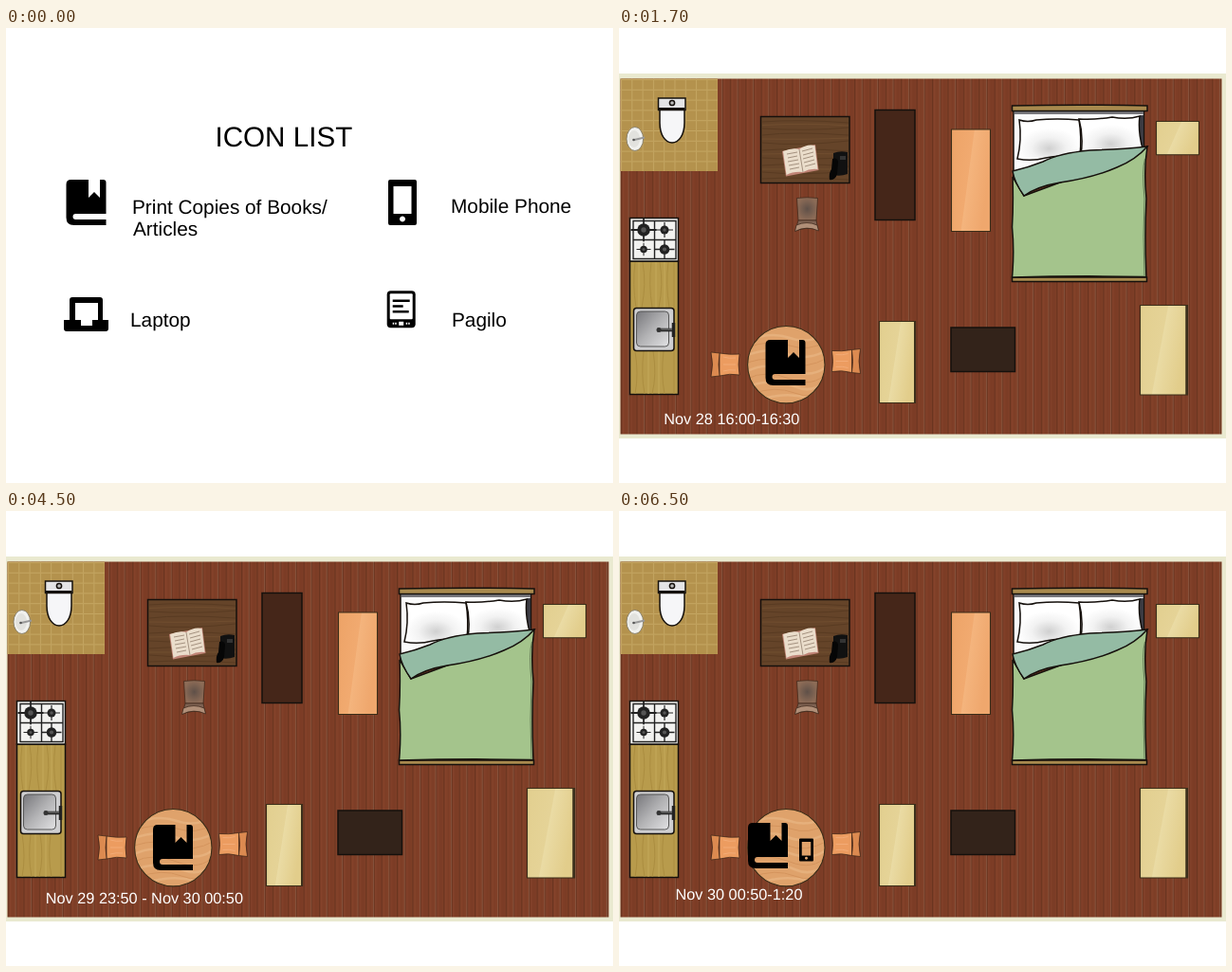
Write an HTML page that moves like this. It is 640x480 px and loops after 8 s.

```html
<!DOCTYPE html>
<html lang="en">
<head>
<meta charset="utf-8">
<title>Icon list and room plan</title>
<style>
html, body { margin: 0; width: 100%; height: 100%; overflow: hidden; background: #fff; }
svg { display: block; width: 100vw; height: 100vh; }
text { font-family: "Liberation Sans", Arial, sans-serif; text-rendering: geometricPrecision; }
.label { font-size: 20.8px; }
.date { font-size: 16.3px; fill: #fff; }
.line { stroke: #15100c; stroke-width: 1.5; }
.edge { stroke: #3a2d18; stroke-width: 1.1; }
.thin { stroke: #3a2417; stroke-width: .7; }
.grain { fill: none; stroke-width: 1; }
.scene { visibility: hidden; animation: 8s step-end infinite; }
#list { animation-name: list; }
#one { animation-name: one; }
#two { animation-name: two; }
#three { animation-name: three; }
#four { animation-name: four; }
@keyframes list { 0% { visibility: visible } 6.25%, 100% { visibility: hidden } }
@keyframes one { 0% { visibility: hidden } 6.25% { visibility: visible } 31.25%, 100% { visibility: hidden } }
@keyframes two { 0% { visibility: hidden } 31.25% { visibility: visible } 56.25%, 100% { visibility: hidden } }
@keyframes three { 0% { visibility: hidden } 56.25% { visibility: visible } 81.25%, 100% { visibility: hidden } }
@keyframes four { 0% { visibility: hidden } 81.25%, 100% { visibility: visible } }
</style>
</head>
<body>
<svg viewBox="0 0 640 480" preserveAspectRatio="none">
<defs>
  <pattern id="planks" x="2" y="53" width="16.4" height="376" patternUnits="userSpaceOnUse">
    <path fill="#814028" d="M0 0H8.2V376H0z"/>
    <path fill="#7d3d26" d="M8.2 0H16.4V376H8.2z"/>
    <path stroke="#68331f" stroke-width="1.2" d="M.7 0V376M8.9 0V376"/>
    <path stroke="#87452c" stroke-width=".8" d="M2.3 0V376M10.5 0V376"/>
    <path stroke="#783a24" stroke-width=".8" d="M5 0V376M13.6 0V376"/>
  </pattern>
  <pattern id="tiles" x="2" y="54" width="11.3" height="10.8" patternUnits="userSpaceOnUse">
    <path fill="#b4924d" d="M0 0H11.3V10.8H0z"/>
    <path fill="none" stroke="#c5a764" stroke-width=".9" d="M.5 10.8V.5H11.3"/>
  </pattern>
  <linearGradient id="pine" x2="1" y2=".35">
    <stop stop-color="#e2cf8f"/><stop offset=".52" stop-color="#e5d397"/>
    <stop offset=".54" stop-color="#eadba4"/><stop offset="1" stop-color="#e2cd8b"/>
  </linearGradient>
  <linearGradient id="peach" x2="1" y2=".35">
    <stop stop-color="#eda367"/><stop offset=".52" stop-color="#f1aa70"/>
    <stop offset=".54" stop-color="#f4b47d"/><stop offset="1" stop-color="#efa76d"/>
  </linearGradient>
  <linearGradient id="steel" x2="1" y2="1">
    <stop stop-color="#77777b"/><stop offset=".5" stop-color="#b2b2b4"/><stop offset="1" stop-color="#e2e2e4"/>
  </linearGradient>
  <radialGradient id="pillow" cy=".72">
    <stop stop-color="#d0d0d0"/><stop offset=".55" stop-color="#f2f2f2"/><stop offset="1" stop-color="#fff"/>
  </radialGradient>
  <radialGradient id="seat"><stop stop-color="#5f5048"/><stop offset="1" stop-color="#8d6c57"/></radialGradient>
  <clipPath id="round"><circle cx="176.3" cy="355.2" r="40.5"/></clipPath>

  <path id="book" d="M5 0H23.5V19L29.5 13L35.5 19V0H39Q42 0 42 3V36H10a3 3 0 0 0 0 6H42V48H8Q0 48 0 40V5Q0 0 5 0z"/>
  <path id="laptop" fill-rule="evenodd" d="M6 24V3Q6 0 9 0H38Q41 0 41 3V24H47V33Q47 36 44 36H3Q0 36 0 33V24zM12 6V24H18V30H30V24H36V6z"/>
  <path id="phone" fill-rule="evenodd" d="M2 0H28Q30 0 30 2V46Q30 48 28 48H2Q0 48 0 46V2Q0 0 2 0zM5.500 7V36H24.500V7zM15 38.500a3 3 0 1 0 .01 0z"/>
  <g id="reader">
    <rect width="30" height="39" rx="4"/>
    <rect x="3" y="3" width="24" height="27" rx="1" fill="#fff"/>
    <path stroke="#000" stroke-width="2.500" d="M6 10.500H24M6 16.300H17M6 22H23"/>
    <path fill="#fff" d="M12.500 32.500h5v4h-5zM6 33.500h4v2H6zM20 33.500h4v2h-4z"/>
    <path stroke="#000" d="M8 33V36M22 33V36"/>
  </g>
  <g id="burner">
    <path stroke="#222" stroke-width="1.300" d="M-10 0H10M0-9V9"/>
    <circle r="5" fill="#222"/><circle r="2" fill="#555"/>
  </g>
  <!-- seat on the left, backrest on the right -->
  <g id="chair">
    <path class="thin" fill="#ec9c60" d="M1 2Q11 3 22 1V25Q11 22 1 24Q3 13 1 2z"/>
    <path class="thin" fill="#dc8a50" d="M22 1L31 0Q28 13 31 26L22 25Q24 13 22 1z"/>
    <path class="grain" stroke="#f2ab77" d="M5 6Q12 7 18 5M5 13H18M5 19Q12 18 18 20"/>
  </g>
</defs>

<g id="room">
  <path fill="#fff" d="M0 0H640V480H0z"/>
  <path fill="#e9e9d0" d="M0 48H640V433H0z"/>
  <path fill="url(#planks)" d="M1.500 53.500H635.500V428.500H1.500z"/>
  <path fill="url(#tiles)" d="M1.500 53.500H104V151H1.500z"/>

  <!-- bathroom -->
  <g class="line">
    <path fill="#f6f6f8" d="M43 86V100C43 113 49 121 56 121S69 113 69 100V86z"/>
    <path fill="#e4e4e6" d="M41.500 74H70V86.500H41.500z"/>
    <path d="M42 85.500H69.500" stroke-width="3"/>
    <circle cx="56" cy="79" r="2.600" fill="#bbb"/>
  </g>
  <ellipse cx="16.800" cy="117" rx="8.800" ry="12.500" fill="#f1f1ee" stroke="#77705f" stroke-width=".8"/>
  <ellipse cx="16" cy="117" rx="6" ry="9" fill="#e2e2de"/>
  <path stroke="#999" stroke-width="2" d="M16 118L27 115.500"/>
  <circle cx="15.500" cy="118" r="1.300" fill="#555"/>

  <!-- desk -->
  <path class="line" fill="#654429" d="M149.500 93.500H243V163.500H149.500z"/>
  <path class="grain" stroke="#593b22" d="M151 99Q190 96 242 100M151 106Q200 109 242 105M151 113Q185 109 242 113M151 121Q190 125 242 119M151 129Q190 126 242 130M151 137Q200 140 242 136M151 145Q190 142 242 146M151 152Q195 156 242 151M151 159Q190 157 242 160"/>
  <path class="grain" stroke="#714e2f" d="M151 102.500Q200 100 242 103M151 117Q200 118 242 116M151 133Q190 132 242 133M151 149Q190 149 242 149"/>
  <path fill="#c08476" d="M172 130L207 123L210.500 150L176 156.500z"/>
  <path fill="#eaddcb" d="M173 130Q183 126 190 128Q198 122 206.500 124L209.500 149Q201 148 194 152Q184 151 176.500 155z"/>
  <path stroke="#a4917f" d="M190 128L194 152M177 133L188 131M178 137L188 135M178 141L189 139M179 145L190 143M180 149L190 147M193 130L204 127M194 134L205 131M194 138L205 135M195 142L206 139M196 146L207 143"/>
  <path fill="#111" d="M226 132Q233 129 241 131L241 154Q233 157 226 155z"/>
  <path fill="#060606" d="M225 138Q230 136 231 141L230 154Q228 161 222 160Q221 153 224 149z"/>
  <path fill="#333" d="M233 135H239V139H233z"/>

  <!-- desk chair -->
  <path class="thin" fill="url(#seat)" d="M187.500 179.500Q198 178 209.500 179.500L208 203H189z"/>
  <path class="thin" fill="#7e6252" d="M189 203H208L210 213Q198 209 186 214z"/>
  <path class="thin" fill="#b08f78" d="M187 208Q198 203 209 208L210.500 214Q198 208 185.500 214.500z"/>

  <!-- cupboards -->
  <path class="line" fill="#452619" d="M270 86.500H312V202.500H270z"/>
  <path class="edge" fill="url(#peach)" d="M350.500 107H391.500V214.500H350.500z"/>
  <path class="edge" fill="url(#pine)" d="M566.500 98.500H611.500V133.800H566.500z"/>
  <path class="edge" fill="url(#pine)" d="M274.500 309.500H312.500V395.500H274.500z"/>
  <path stroke="#3c301c" stroke-width="2" d="M312 310V395.500"/>
  <path class="edge" fill="url(#pine)" d="M549.500 292.500H599.500V387H549.500z"/>
  <path stroke="#3c301c" stroke-width="2.500" d="M598.500 292.500V387"/>
  <path class="line" fill="#33231a" d="M350 316H417.500V362.500H350z"/>

  <!-- bed -->
  <path class="line" fill="#fafafa" d="M416 87H553.500V160H416z"/>
  <path fill="#77777c" d="M417 88H553V91H417z"/>
  <path fill="#3b3b42" d="M549 92H553V126H549z"/>
  <path class="line" fill="#a98a4e" d="M414.500 82Q486 80.500 557 82V87.500H414.500z"/>
  <g class="line" fill="url(#pillow)">
    <path d="M422 97Q431 100 440 97Q462 95 485 97Q488 115 486 135Q465 134 450 137Q435 141 420 138Q425 118 422 97z"/>
    <path d="M485 96Q502 97 520 94Q536 97 549 93Q547 109 552 127Q530 128 518 131Q502 130 487 134Q490 114 485 96z"/>
  </g>
  <path class="line" fill="#a98a4e" d="M414.500 263H556.500V267.500H414.500z"/>
  <path class="line" fill="#a4c48c" d="M415 157L427 177L500 150L557 125Q553 150 556 180Q554 220 556 262.500Q485 261 414.500 263Q417 235 414.500 210Q416 185 415 157z"/>
  <path class="line" fill="#94bba4" d="M415 151Q432 147 447 141Q464 132 497 129Q530 128 557 125Q545 139 525 147Q500 158 465 163Q441 167 427 177Q417 163 415 151z"/>
  <path class="grain" stroke="#4c5f42" stroke-opacity=".7" d="M554.500 138Q551 150 554 180Q552 220 554 261"/>

  <!-- kitchen -->
  <path class="line" fill="#b89b4c" d="M11.500 246H62.500V386.500H11.500z"/>
  <path class="grain" stroke="#ab8d40" d="M17 247Q14 270 18 295M25 247Q29 270 24 295M34 247Q31 270 35 295M43 247Q47 270 42 295M52 247Q49 270 53 295M58 247V386M17 341Q21 365 17 386M26 341Q23 365 27 386M36 341Q40 365 35 386M47 341Q44 365 48 386"/>
  <path class="grain" stroke="#c4a95b" d="M21 247V295M39 247V295M48 247V295M31 341V386M42 341V386"/>
  <path class="line" fill="#f2f2f0" d="M11.500 200.500H62.500V246H11.500z"/>
  <path fill="none" stroke="#222" stroke-width="1.400" d="M15 203.500H60V243.500H15zM37.500 204V243M15 223.500H60"/>
  <use href="#burner" transform="translate(26 213) scale(1.350)"/>
  <use href="#burner" transform="translate(48 213) scale(.9)"/>
  <use href="#burner" transform="translate(26 233.500) scale(.75)"/>
  <use href="#burner" transform="translate(48 233.500) scale(1.050)"/>
  <rect class="line" x="15.500" y="295.500" width="42.500" height="45" rx="3" fill="#cfcfd1"/>
  <rect x="18.500" y="299" width="34" height="37" rx="4" fill="url(#steel)" stroke="#555"/>
  <path stroke="#222" stroke-width="3.500" d="M40 318.500H58M57.500 311V326"/>
  <path stroke="#888" d="M42 318H56"/>
  <circle cx="42" cy="318.500" r="2.500" fill="#333"/>

  <!-- dining table -->
  <use href="#chair" transform="translate(128 342) scale(-1 1)"/>
  <use href="#chair" x="223.500" y="338.500"/>
  <circle cx="176.300" cy="355.200" r="40.700" fill="#dfa26b"/>
  <g clip-path="url(#round)" class="grain">
    <path stroke="#e6b07c" stroke-width="2.500" d="M135 330Q160 320 180 327T220 322M135 345Q160 336 178 344T220 340M135 362Q155 352 180 361T220 356M135 378Q165 369 185 378T220 370M145 394Q170 383 200 390"/>
    <path stroke="#d4945d" d="M135 337Q160 328 180 335T220 330M135 353Q160 345 178 353T220 348M135 370Q155 360 180 370T220 363M140 386Q165 377 185 385T220 380"/>
  </g>
  <circle class="edge" cx="176.300" cy="355.200" r="40.700" fill="none"/>
</g>

<g id="one" class="scene">
  <use href="#book" x="154.500" y="329"/>
  <text class="date" x="47.300" y="418">Nov 28 16:00-16:30</text>
</g>
<g id="two" class="scene">
  <use href="#laptop" x="152.500" y="336"/>
  <text class="date" x="50" y="410">Nov 28 23:15 - Nov 29 00:15</text>
</g>
<g id="three" class="scene">
  <use href="#book" x="155" y="331"/>
  <text class="date" x="41.800" y="413.500">Nov 29 23:50 - Nov 30 00:50</text>
</g>
<g id="four" class="scene">
  <use href="#book" x="136" y="329"/>
  <use href="#phone" transform="translate(190 345.500) scale(.5)"/>
  <text class="date" x="59.500" y="410">Nov 30 00:50-1:20</text>
</g>

<g id="list" class="scene">
  <path fill="#fff" d="M0 0H640V480H0z"/>
  <text x="220.500" y="124.500" font-size="29.600">ICON LIST</text>
  <use href="#book" x="63.500" y="160"/>
  <use href="#phone" x="403" y="160"/>
  <use href="#laptop" x="61" y="284"/>
  <use href="#reader" x="401.700" y="277.300"/>
  <g class="label">
    <text x="133" y="195.500">Print Copies of Books/</text>
    <text x="134" y="219">Articles</text>
    <text x="469" y="194.500">Mobile Phone</text>
    <text x="131" y="315">Laptop</text>
    <text x="470" y="315">Pagilo</text>
  </g>
</g>
</svg>
</body>
</html>
```
